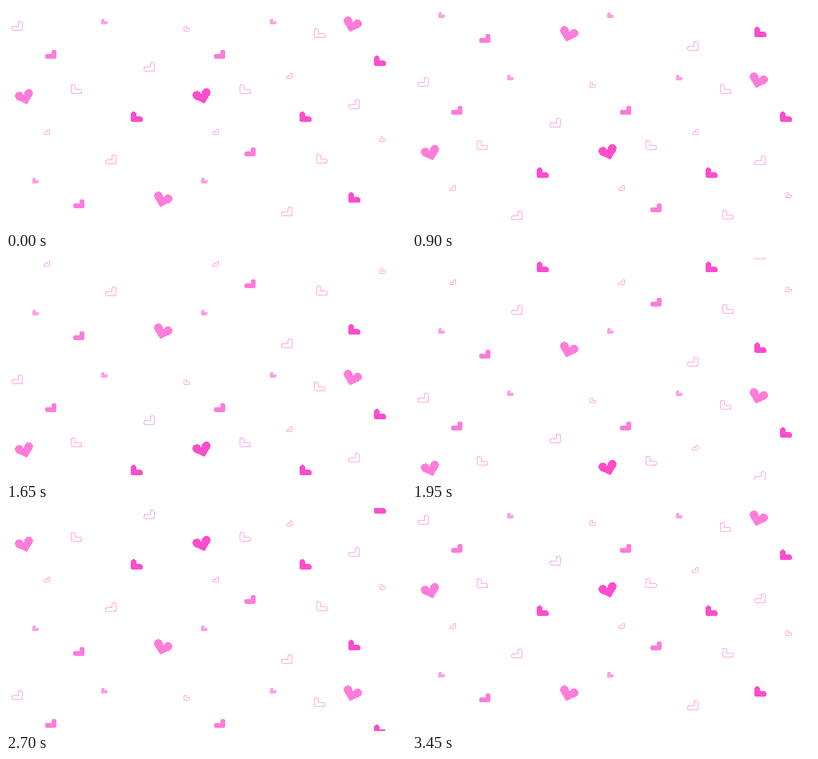
Recreate the animation shown at these times as an HTML page. Size 500 by 279 pixels, loop 3600 ms.

```html
<!DOCTYPE html>
<html lang="en">
<head>
<meta charset="utf-8">
<title>Falling hearts</title>
<style>
html, body { margin: 0; width: 100%; height: 100%; overflow: hidden; background: #fff; }
svg { display: block; width: 500px; height: 279px; }
</style>
</head>
<body>
<svg viewBox="0 0 500 279" shape-rendering="crispEdges">
  <defs>
    <g id="tile" fill="none" stroke-linecap="round" stroke-linejoin="round"></g>
  </defs>
  <use id="upper" href="#tile"/>
  <use id="lower" href="#tile"/>
</svg>
<script>
const HEIGHT = 279, TILE = 277, COLUMN = 211;
const STEP_MS = 150, STEPS = 24;
const LIGHT = '#ff7cda', DARK = '#ff4dcc', PALE = '#ff9fe2', LINE = '#ffaee7';
const HEART = 'M0 12.5L-9.7 3.9A5.3 5.3 0 1 1-1-.5H1A5.3 5.3 0 1 1 9.7 3.9Z';

const byId = id => document.getElementById(id);
const tile = byId('tile'), upper = byId('upper'), lower = byId('lower');

function path(attrs) {
  const p = document.createElementNS('http://www.w3.org/2000/svg', 'path');
  for (const name in attrs) p.setAttribute(name, attrs[name]);
  tile.append(p);
}

function bigHeart(x, y, tilt, fill) {
  path({ d: HEART, fill, transform: `translate(${x} ${y}) rotate(${tilt})` });
}

// A small heart is a thick bent line; side 1 has its corner on the right, -1 on the left
function smallHeart(x, y, { w, h, t, side, color, hollow }) {
  const r = t / 2;
  const d = `M${side * (r - w / 2)} ${h - r}H${side * (w / 2 - r)}V${r}`;
  const transform = `translate(${x + w / 2} ${y})`;
  path({ d, transform, stroke: color, 'stroke-width': t });
  if (hollow) path({ d, transform, stroke: '#fff', 'stroke-width': t - 2 });
}

const bent = { w: 14, h: 11, t: 6, side: 1, color: LIGHT };
const fat = { w: 15, h: 13, t: 7, side: -1, color: DARK };
const dot = { w: 8, h: 7, t: 4, side: -1, color: PALE };
const ring = { w: 14, h: 12, t: 6, side: 1, color: LINE, hollow: true };
const ringLeft = { ...ring, side: -1 };
const bead = { w: 8, h: 7, t: 4, side: 1, color: LINE, hollow: true };
const beadLeft = { ...bead, side: -1 };

const scatter = (kind, ...spots) => spots.forEach(([x, y]) => smallHeart(x, y, kind));
const twice = (kind, ...spots) =>
  spots.forEach(([x, y]) => scatter(kind, [x, y], [x + COLUMN, y]));

bigHeart(22.5, 111, -17, LIGHT);
bigHeart(244.5, 110, -17, DARK);
bigHeart(433.5, 20.5, 17, LIGHT);
bigHeart(196.5, 239.5, 17, LIGHT);

twice(bent, [49, 55]);
twice(fat, [156, 132]);
twice(dot, [119, 16], [33, 215]);
twice(ringLeft, [81, 98]);
twice(bead, [47, 154]);

scatter(bent, [298, 177], [84, 242]);
scatter(fat, [460, 62], [428, 233]);
scatter(ring, [7, 19], [172, 70], [124, 186], [428, 117], [344, 251]);
scatter(ringLeft, [385, 28], [388, 185]);
scatter(bead, [350, 84]);
scatter(beadLeft, [222, 25], [467, 163]);

function draw(ms) {
  const step = Math.floor(ms / STEP_MS) % STEPS;
  const y = Math.round(step * HEIGHT / STEPS);
  upper.setAttribute('y', y - TILE);
  lower.setAttribute('y', y);
}

let start = null;
function tick(now) {
  if (start === null) start = now;
  draw(Math.max(0, now - start));
  requestAnimationFrame(tick);
}
draw(0);
requestAnimationFrame(tick);
</script>
</body>
</html>
```
